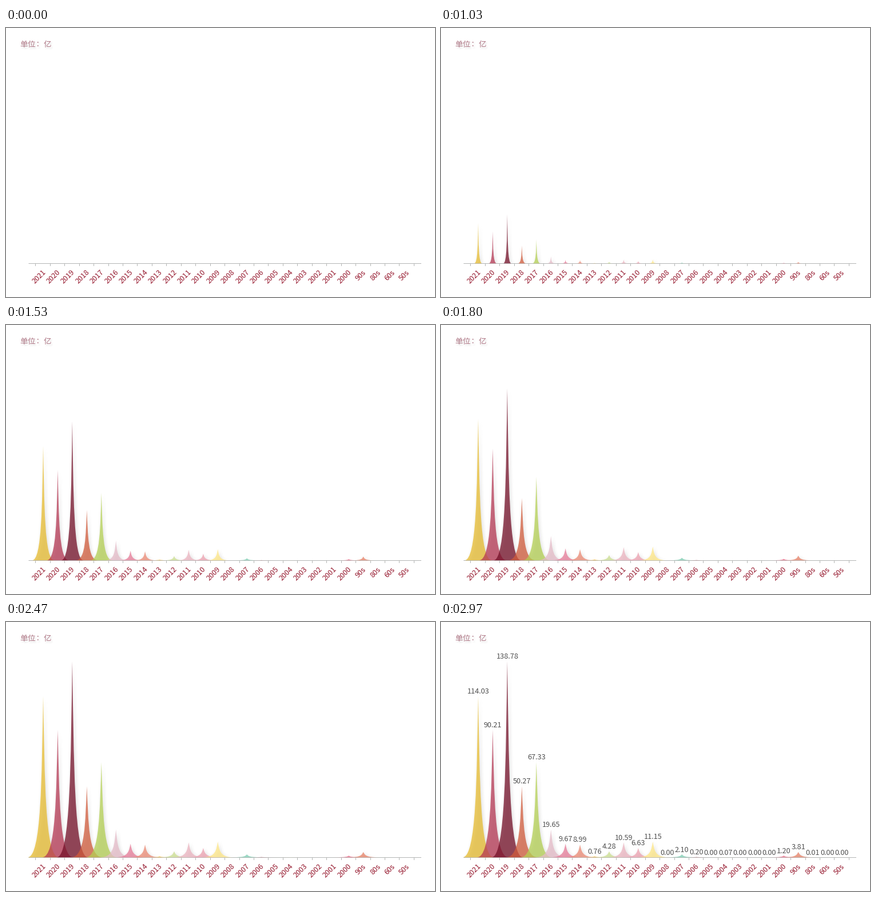
A matplotlib script for the animation above (8 s loop, 750 px wide and 470 px high).

```python
import matplotlib.pyplot as plt
import numpy as np
from itertools import product
from matplotlib.animation import FuncAnimation
from matplotlib.patches import PathPatch, Rectangle
from matplotlib.path import Path

W, H, DPI = 750, 470, 100
LOOP, STEP = 8000, 20
PX = 72 / DPI                    # points per pixel

BASE, LEFT, FIRST, BAND = 411.2, 51.9, 65.0, 25.44
UNIT = 2.4716                    # pixels per value unit
HALF = BAND * 1.08               # half width of a full-grown spike
GROW_START, GROW_TIME = -42, 2700
FADE_START, FADE_TIME = 2740, 230
OPACITY = 0.75
FONT_SIZE = 12.7

NAMES = [str(y) for y in range(2021, 1999, -1)] + ["90s", "80s", "60s", "50s"]
VALUES = [114.03, 90.21, 138.78, 50.27, 67.33, 19.65, 9.67, 8.99, 0.76,
          4.28, 10.59, 6.63, 11.15, 0, 2.10, 0.20, 0, 0.07, 0, 0, 0,
          1.20, 3.81, 0.01, 0, 0]
# colours as they look on the page
COLORS = ("#e9c95f #c4657a #93485a #d98068 #c3d87a #e8c8d2 #e998ae #eda392 "
          "#f0c870 #d5e3a8 #edc3cc #eeb5c0 #fbe9a0 #d5e3a8 #98d5c0 #b06070 "
          "#e9c95f #eeeeaa #93485a #d98068 #c3d87a #e98aa0 #e99c88 #98d5c0 "
          "#e9c95f #c4657a").split()

SPIKE = np.array([(-1, 0), (1, 0), (.1, 0), (.1, .5), (0, 1),
                  (-.1, .5), (-.1, 0), (-1, 0)])
CODES = [Path.MOVETO, Path.LINETO] + [Path.CURVE4] * 6

CENTERS = FIRST + BAND * np.arange(len(NAMES))

plt.rcParams["font.family"] = "Noto Sans CJK JP"
fig = plt.figure(figsize=(W / DPI, H / DPI), dpi=DPI, facecolor="white")
ax = fig.add_axes([0, 0, 1, 1])
ax.set_xlim(0, W)
ax.set_ylim(H, 0)
ax.axis("off")


def unblend(color, back=0.94):
    """Pure colour that gives `color` over the shaded page."""
    rgb = np.array([int(color[i:i + 2], 16) for i in (1, 3, 5)]) / 255
    return tuple(np.clip((rgb - back * (1 - OPACITY)) / OPACITY, 0, 1))


def spike(x, value, scale, y=BASE):
    size = np.array([HALF, -value * UNIT]) * scale
    return Path(SPIKE * size + (x, y), CODES)


def cubic_in_out(u):
    u = min(max(u, 0), 1)
    return 4 * u ** 3 if u < 0.5 else 1 - 4 * (1 - u) ** 3


def line(xs, ys):
    ax.plot(xs, ys, color="#b4b6b5", lw=PX, solid_capstyle="butt",
            snap=False, zorder=1)


def text(x, y, s, size=FONT_SIZE, **kw):
    return ax.text(x, y, s, fontsize=size * PX, va="baseline", **kw)


def add_title():
    size, y = 13.6, 33.4
    for s, x in (("单", 31.2), ("位", 44.8), ("：", 55), ("亿", 72)):
        for dx, dy in product((1, 3), (2, 4)):
            text(x + dx, y + dy, s, size, color="black", alpha=0.025,
                 ha="center")
        text(x, y, s, size, color="#b07a88", ha="center")


def add_axis():
    line([39.5, 726], [411.5, 411.5])
    for k in range(len(NAMES) + 1):
        x = int(LEFT + BAND * k) + 0.5
        line([x, x], [412, 416])
    for x, name in zip(CENTERS, NAMES):
        text(x + 5, 427.5, name, color="#971b30", ha="right",
             rotation=45, rotation_mode="anchor")


add_title()
add_axis()

# soft shadow: faint copies of the spikes spread on two rings
above = Rectangle((0, 0), W, 411, transform=ax.transData)
shadows = []
for radius, angle in product((2.5, 5.5), np.arange(8) * np.pi / 4):
    layer = PathPatch(spike(0, 0, 0), facecolor="black", lw=0,
                      alpha=0.009, zorder=2)
    ax.add_patch(layer)
    layer.set_clip_path(above)
    shadows.append((layer, 2 + radius * np.cos(angle),
                    2 + radius * np.sin(angle)))

bars = [ax.add_patch(PathPatch(spike(x, v, 0), facecolor=unblend(c),
                               alpha=OPACITY, lw=0, zorder=3))
        for x, v, c in zip(CENTERS, VALUES, COLORS)]
labels = [text(x, BASE - v * UNIT - 4.5, f"{v:.2f}", color="#505050",
               ha="center", zorder=4, visible=False)
          for x, v in zip(CENTERS, VALUES)]


def draw(frame):
    t = (frame + 0.5) * STEP
    scale = cubic_in_out((t - GROW_START) / GROW_TIME)
    for bar, x, v in zip(bars, CENTERS, VALUES):
        bar.set_path(spike(x, v, scale))

    tall = [(x, v) for x, v in zip(CENTERS, VALUES) if v * UNIT * scale > 6]
    for layer, dx, dy in shadows:
        layer.set_visible(bool(tall))
        if tall:
            layer.set_path(Path.make_compound_path(
                *[spike(x + dx, v, scale, BASE + dy) for x, v in tall]))

    fade = min(max((t - FADE_START) / FADE_TIME, 0), 1)
    for label in labels:
        label.set_visible(fade > 0)
        label.set_alpha(fade)
    return bars + labels + [layer for layer, *_ in shadows]


anim = FuncAnimation(fig, draw, frames=LOOP // STEP, interval=STEP,
                     repeat=True, blit=False)
plt.show()
```
